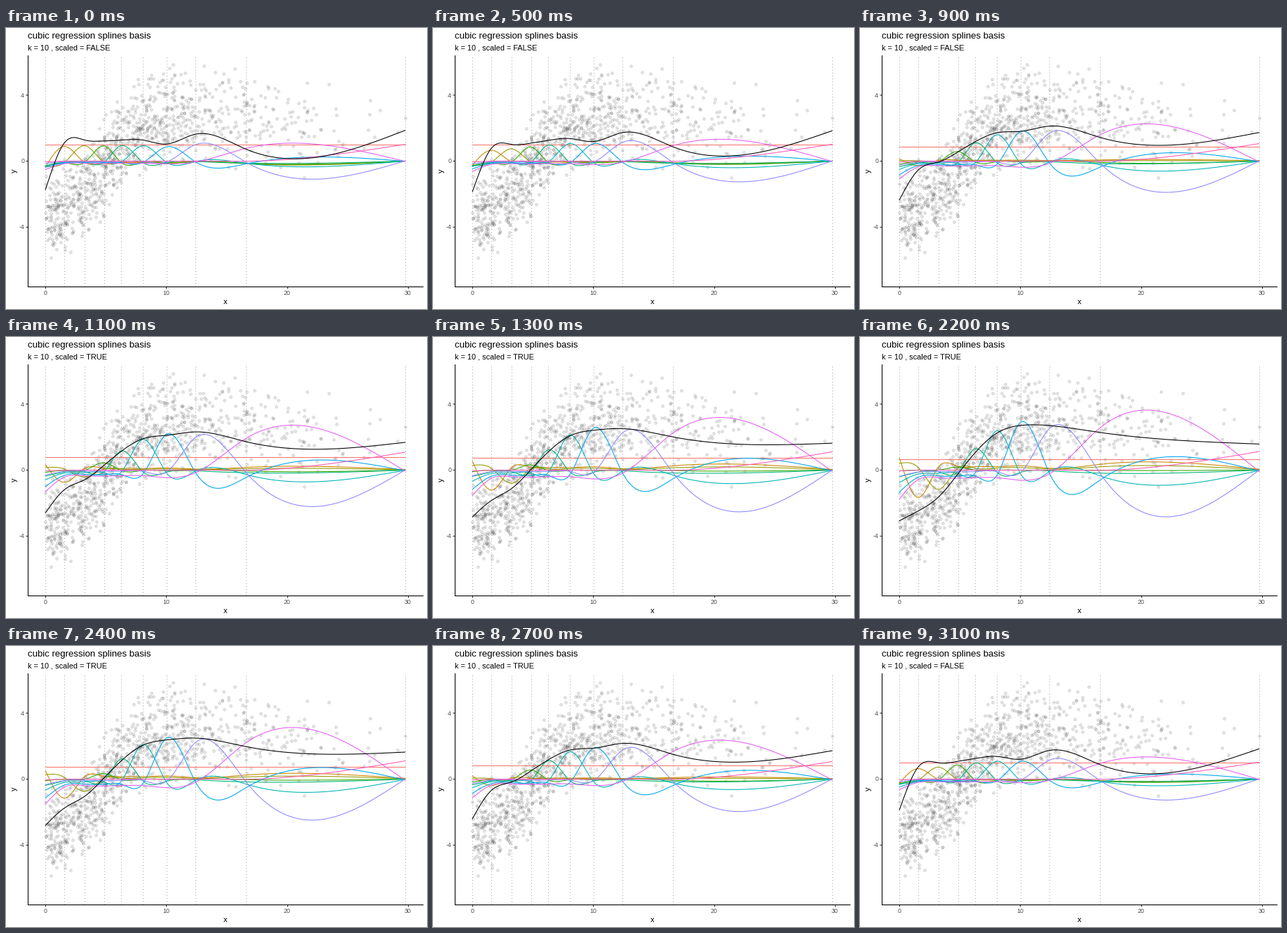
Recreate the animation shown at these times as a matplotlib script. Size 600x400 px, loop 3.2 s.

```python
import numpy as np
import matplotlib.pyplot as plt
from matplotlib.animation import FuncAnimation

W, H = 600, 400
LEFT, RIGHT, TOP, BOTTOM = 30.7, 594.4, 38.8, 368.0   # panel edges in pixels
X0, Y0, SX, SY = 56.2, 189.1, 17.22, 23.42            # origin and pixels per unit
LINE = 1.07

COLORS = ["#F8766D", "#CC8400", "#989A00", "#35AA00", "#00B476",
          "#00B4B8", "#00A6EE", "#8F88FF", "#E35FF0", "#FF5AB8"]
KNOTS = np.array([0, 1.57, 3.25, 4.85, 6.24, 8.04, 10.05, 12.4, 16.58, 29.76])
# fitted curve at the knots
FIT = np.array([-3.23, -2.85, -1.93, -0.38, 1.0, 2.32, 2.87, 2.8, 2.43, 1.54])


def cr_basis(x):
    """Natural cubic spline basis, one column per knot."""
    n, h = len(KNOTS), np.diff(KNOTS)
    D = np.zeros((n - 2, n))
    B = np.zeros((n - 2, n - 2))
    for i in range(n - 2):
        D[i, i:i + 3] = 1 / h[i], -1 / h[i] - 1 / h[i + 1], 1 / h[i + 1]
        B[i, i] = (h[i] + h[i + 1]) / 3
        if i < n - 3:
            B[i, i + 1] = B[i + 1, i] = h[i + 1] / 6
    curve = np.zeros((n, n))
    curve[1:-1] = np.linalg.solve(B, D)

    j = np.clip(np.searchsorted(KNOTS, x, side="right") - 1, 0, n - 2)
    hj, up, down = h[j], KNOTS[j + 1] - x, x - KNOTS[j]
    eye = np.eye(n)
    low = (up ** 3 / hj - hj * up) / 6
    high = (down ** 3 / hj - hj * down) / 6
    return ((up / hj)[:, None] * eye[j] + (down / hj)[:, None] * eye[j + 1]
            + low[:, None] * curve[j] + high[:, None] * curve[j + 1])


def make_points():
    """Half-normal x with the knots as its quantiles, noisy y around the fit."""
    rng = np.random.default_rng(7)
    x = np.abs(rng.normal(0, 10, 1010))
    x = x[x < KNOTS[-1]]
    x = np.interp(x, np.quantile(x, np.linspace(0, 1, len(KNOTS))), KNOTS)
    noise = rng.normal(0, 1.35, len(x))
    keep = np.abs(noise) < 3.1
    return x[keep], (cr_basis(x) @ FIT + noise)[keep]


def constrained(x, c):
    """Intercept plus the spline basis with a sum-to-zero constraint."""
    v = c.copy()
    v[0] += np.linalg.norm(c)
    Z = (np.eye(len(c)) - 2 * np.outer(v, v) / (v @ v))[:, 1:]
    mean = c @ FIT / c.sum()
    coef = np.append(mean, Z.T @ (FIT - mean))
    return np.column_stack([np.ones(len(x)), cr_basis(x) @ Z]), coef


px, py = make_points()
grid = np.linspace(0, KNOTS[-1], 500)
basis, coef = constrained(grid, cr_basis(px).sum(axis=0))

plt.rcParams["font.family"] = "Liberation Sans"
fig = plt.figure(figsize=(W / 72, H / 72), dpi=72, facecolor="white")
ax = fig.add_axes([LEFT / W, 1 - BOTTOM / H, (RIGHT - LEFT) / W, (BOTTOM - TOP) / H])
ax.set_xlim((LEFT - X0) / SX, (RIGHT - X0) / SX)
ax.set_ylim((Y0 - BOTTOM) / SY, (Y0 - TOP) / SY)
ax.set_xticks([0, 10, 20, 30], [])
ax.set_yticks([-4, 0, 4], [])
ax.tick_params(length=2.75, width=LINE, color="#333333")
ax.spines[["top", "right"]].set_visible(False)
ax.spines[["left", "bottom"]].set_linewidth(LINE)


def label(x, y, text, size, **kw):
    return fig.text(x / W, 1 - y / H, text, fontsize=size, **kw)


label(LEFT, 15, "cubic regression splines basis", 13.2)
subtitle = label(LEFT, 31.2, "", 11)
label(312.5, 393, "x", 11, ha="center")
label(11.5, 203.5, "y", 11, ha="center", va="center", rotation=90)
for t in (0, 10, 20, 30):
    label(X0 + SX * t, 380, str(t), 8.8, ha="center", color="#4D4D4D")
for t in (-4, 0, 4):
    label(26, Y0 - SY * t + 3.2, str(t), 8.8, ha="right", color="#4D4D4D")

ax.scatter(px, py, s=3.9 ** 2, facecolors=(0, 0, 0, 0.1),
           edgecolors=(0, 0, 0, 0.1), linewidths=0.94, zorder=1)
for k in KNOTS:
    ax.axvline(k, color="#AAAAAA", lw=LINE, ls=(0, (1, 3)), zorder=2)
curves = [ax.plot([], [], color=c, lw=LINE, zorder=3)[0] for c in COLORS]
total, = ax.plot([], [], color="black", lw=LINE, zorder=4)


def progress(i):
    if i < 5:
        return 0
    if i < 17:
        return (i - 4) / 12
    if i < 22:
        return 1
    return (32 - i) / 11


def draw(i):
    p = progress(i)
    parts = basis * (1 - p + p * coef)
    for line, part in zip(curves, parts.T):
        line.set_data(grid, part)
    total.set_data(grid, parts.sum(axis=1))
    scaled = "TRUE" if 11 <= i < 28 else "FALSE"
    subtitle.set_text(f"k = 10 , scaled = {scaled}")
    return [*curves, total, subtitle]


anim = FuncAnimation(fig, draw, frames=32, interval=100, repeat=True, blit=False)
plt.show()
```
